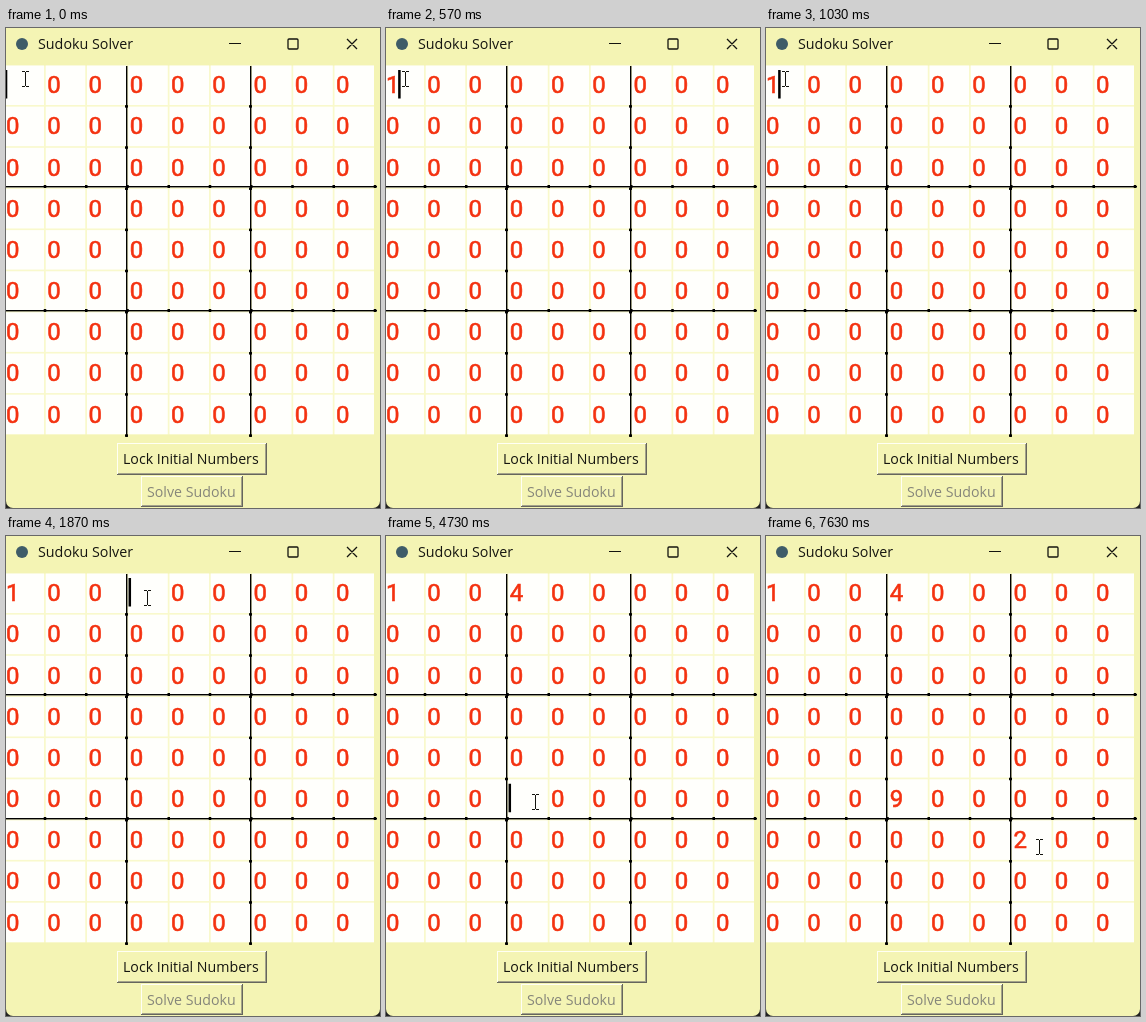
Animation of 374x480 px, one loop 8 s. Source, as an HTML page with a canvas:

```html
<!DOCTYPE html>
<html lang="en">
<head>
<meta charset="utf-8">
<title>Sudoku Solver</title>
<style>
html, body { margin: 0; width: 100%; height: 100%; overflow: hidden; background: #222; }
canvas { display: block; width: 374px; height: 480px; }
</style>
</head>
<body>
<canvas id="stage" width="374" height="480"></canvas>
<script>
const ctx = document.getElementById('stage').getContext('2d');
const LOOP = 8000, TOP = 37.5, STEP_X = 41.25, STEP_Y = 41.15;
const BACK = '#f4f4b4', INK = '#14140f', RED = '#f43210';
const UI = '"Open Sans", "Noto Sans", sans-serif';
const DIGIT = '24px Roboto, "Liberation Sans", sans-serif';

// Each visit: the pointer glides to (x, y), the cell gets the caret,
// its zero is cleared and a new digit typed. The caret blinks off in `hide`.
const visits = [
  { col: 0, row: 0, x: 19, y: 51, move: -1000, focus: -500, clear: -300, type: 170, digit: '1', hide: [730, 1030] },
  { col: 3, row: 0, x: 141, y: 62, bend: 22, move: 1240, focus: 1720, clear: 1870, type: 2470, digit: '4', hide: [3000, 3070] },
  { col: 3, row: 5, x: 149, y: 266, bend: 0, move: 3820, focus: 3890, clear: 4730, type: 4970, digit: '9', hide: [0, 0] },
  { col: 6, row: 6, x: 273, y: 311, bend: 40, move: 5880, focus: 6350, clear: 6930, type: 7070, digit: '2', hide: [7630, LOOP] }
];

function rect(x, y, w, h, color) {
  ctx.fillStyle = color;
  ctx.fillRect(x, y, w, h);
}

function text(str, x, y, font, color) {
  ctx.font = font;
  ctx.fillStyle = color;
  ctx.fillText(str, x, y);
}

function cellText(col, row, t) {
  const v = visits.find(v => v.col === col && v.row === row);
  if (!v || t < v.clear) return '0';
  return t < v.type ? '' : v.digit;
}

function drawWindow() {
  rect(0, 0, 374, 480, '#222');
  ctx.fillStyle = BACK;
  ctx.beginPath();
  ctx.roundRect(0, 0, 374, 480, [0, 0, 7, 7]);
  ctx.fill();

  ctx.fillStyle = '#3f5c68';
  ctx.beginPath();
  ctx.arc(16, 16, 6, 0, Math.PI * 2);
  ctx.fill();
  text('Sudoku Solver', 32, 21, '14.3px ' + UI, INK);

  rect(223, 15, 12, 1, INK);
  ctx.strokeStyle = INK;
  ctx.lineWidth = 1.3;
  ctx.beginPath();
  ctx.roundRect(282, 11, 10, 10, 1);
  ctx.moveTo(341, 11);
  ctx.lineTo(351, 21);
  ctx.moveTo(351, 11);
  ctx.lineTo(341, 21);
  ctx.stroke();
}

function drawBoard(t) {
  rect(0, TOP, 368, 369, '#f9f9cc');
  ctx.strokeStyle = RED;
  ctx.lineWidth = 0.6;
  for (let r = 0; r < 9; r++) {
    for (let c = 0; c < 9; c++) {
      const x = c * STEP_X, y = TOP + r * STEP_Y;
      const str = cellText(c, r, t);
      rect(x - 1.5, y, 39.5, 39.5, '#fffffc');
      text(str, x, y + 27.8, DIGIT, RED);
      ctx.strokeText(str, x, y + 27.8);
    }
  }
  // Block borders, slightly thicker where cells meet
  for (const n of [3, 6]) {
    const x = Math.round(n * STEP_X - 4), y = Math.round(35 + n * STEP_Y);
    rect(x, 38, 1.4, 371, '#000');
    rect(0, y, 371, 1.4, '#000');
    for (let i = 1; i < 10; i++) {
      rect(x - 1, 36 + i * STEP_Y, 3, 2.5, '#000');
      rect(i * STEP_X - 3.5, y - 1, 2.5, 3, '#000');
    }
  }
}

function drawButton(x, y, w, h, label, color) {
  rect(x, y, w, h, '#65655c');
  rect(x, y, w - 1, h - 1, '#fffff4');
  rect(x + 1, y + 1, w - 2, h - 2, '#a3a28a');
  rect(x + 1, y + 1, w - 3, h - 3, BACK);
  text(label, x + 6, y + 21, '14.2px ' + UI, color);
}

function drawCaret(t) {
  const { col, row, hide } = visits.findLast(v => t >= v.focus);
  if (t >= hide[0] && t < hide[1]) return;
  const shift = cellText(col, row, t) ? 13.35 : 0;
  rect(col * STEP_X - 1.2 + shift, TOP + 4.5 + row * STEP_Y, 2.5, 28.5, '#000');
}

// Fast start, long settle, with a slight sag on the way
function pointerAt(t) {
  const i = visits.findLastIndex(v => t >= v.move);
  const to = visits[i], from = visits[i - 1];
  if (!from || t >= to.focus) return [to.x, to.y];
  const k = 1 - (1 - (t - to.move) / (to.focus - to.move)) ** 8;
  const sag = to.bend * Math.sin(Math.PI * k);
  return [from.x + (to.x - from.x) * k, from.y + (to.y - from.y) * k + sag].map(Math.round);
}

function drawPointer(t) {
  const [x, y] = pointerAt(t);
  rect(x, y - 7, 1, 14, INK);
  for (const end of [y - 8, y + 7]) {
    rect(x - 3, end, 3, 1, INK);
    rect(x + 1, end, 3, 1, INK);
  }
}

function draw() {
  const t = performance.now() % LOOP;
  drawWindow();
  drawBoard(t);
  drawButton(111, 415, 150, 32, 'Lock Initial Numbers', INK);
  drawButton(135, 448, 102, 31, 'Solve Sudoku', '#85857a');
  drawCaret(t);
  drawPointer(t);
  requestAnimationFrame(draw);
}
draw();
</script>
</body>
</html>
```
